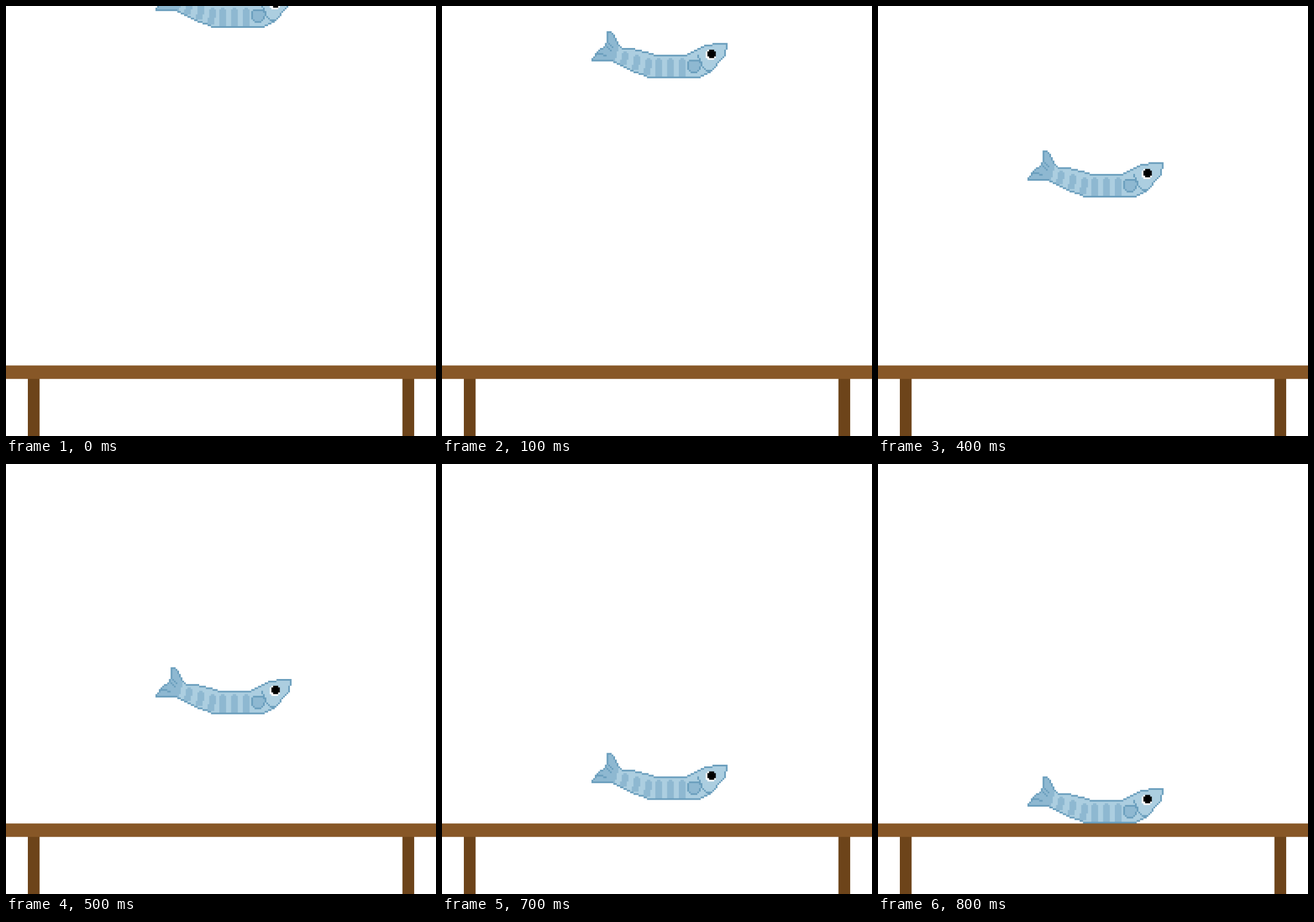
An HTML page with a canvas that plays this animation: 748x748 px, repeating every 900 ms.

```html
<!DOCTYPE html>
<html lang="en">
<head>
<meta charset="utf-8">
<title>Falling fish</title>
<style>
  html, body { margin: 0; width: 100%; height: 100%; overflow: hidden; background: #fff; }
  canvas { display: block; width: 100vw; height: 100vh; }
</style>
</head>
<body>
<canvas id="stage" width="768" height="768"></canvas>
<script>
const LINE = '#6a9ebd', BODY = '#accee0', DARK = '#8eb8d1';
const GRID = 256, CELL = 3, STEP = 100;
const FISH_X = 89, FISH_W = 81, FISH_H = 28;

// row of the fish's underside after each step
const falls = [13, 43, 73, 73, 114, 149, 182, 200, 214];

// corners in drawing order: tail, belly, snout, back
const outline = [
  [11, 0], [9, 0], [9, 5], [8, 8], [4, 11], [0, 16], [0, 17],
  [12, 17], [21, 22], [34, 27], [63, 27], [70, 24],
  [78, 15], [79, 14], [80, 7], [72, 7], [71, 8], [67, 8],
  [59, 12], [55, 14], [38, 14], [36, 13], [24, 10], [18, 10], [16, 8], [12, 1]
];
const fin = [[58, 17], [63, 17], [65, 19], [65, 20], [62, 24], [59, 24], [57, 22], [57, 18]];
const gill = [[63, 14], [63, 15], [65, 18], [65, 20], [68, 23], [70, 23]];

function painter(ctx) {
  const rect = (color, x, y, w = 1, h = 1) => {
    ctx.fillStyle = color;
    ctx.fillRect(x, y, w, h);
  };

  const line = (color, pts) => {
    for (let i = 1; i < pts.length; i++) {
      const [x0, y0] = pts[i - 1], [x1, y1] = pts[i];
      const n = Math.max(Math.abs(x1 - x0), Math.abs(y1 - y0));
      for (let k = 0; k <= n; k++) {
        rect(color, Math.round(x0 + (x1 - x0) * k / n), Math.round(y0 + (y1 - y0) * k / n));
      }
    }
  };

  const inside = (pts, x, y) => pts.reduce((odd, [ax, ay], i) => {
    const [bx, by] = pts[(i + 1) % pts.length];
    const hit = (ay > y) !== (by > y) && x < ax + (bx - ax) * (y - ay) / (by - ay);
    return hit ? !odd : odd;
  }, false);

  const shape = (pts, colorAt) => {
    for (let y = 0; y < FISH_H; y++) {
      for (let x = 0; x < FISH_W; x++) {
        if (inside(pts, x, y)) rect(colorAt(x, y), x, y);
      }
    }
    line(LINE, [...pts, pts[0]]);
  };

  // square with its corner cells cut off
  const dot = (color, x, y, size) => {
    rect(color, x + 1, y, size - 2, size);
    rect(color, x, y + 1, size, size - 2);
  };

  return { rect, line, shape, dot };
}

function makeFish() {
  const sprite = document.createElement('canvas');
  sprite.width = FISH_W;
  sprite.height = FISH_H;
  const { rect, line, shape, dot } = painter(sprite.getContext('2d'));

  shape(outline, (x, y) => x + y / 4 < 18 ? DARK : BODY);

  // stripes lean towards the tail, then stand upright along the belly
  for (let i = 0; i < 6; i++) {
    const top = Math.min(12 + 2 * i, 16), bottom = Math.min(19 + 3 * i, 26);
    const lean = i < 3 ? 1.4 : 0;
    for (let y = top; y <= bottom; y++) {
      const x = Math.round(17 + 7 * i + lean * (bottom - y) / (bottom - top));
      if (y === top) rect(DARK, x + 1, y, 2);
      else rect(DARK, x, y, 4);
    }
  }

  line(LINE, [[9, 6], [12, 9]]);
  line(LINE, [[9, 9], [11, 11]]);
  line(LINE, [[3, 13], [6, 13], [8, 14]]);
  shape(fin, () => DARK);
  line(LINE, gill);
  dot('#fff', 68, 11, 6);
  dot('#000', 69, 11, 5);
  return sprite;
}

const ctx = document.getElementById('stage').getContext('2d');
ctx.scale(CELL, CELL);
ctx.imageSmoothingEnabled = false;
const { rect } = painter(ctx);
const fish = makeFish();

function draw(time) {
  const bottom = falls[Math.floor(time / STEP) % falls.length];
  rect('#fff', 0, 0, GRID, GRID);
  for (const x of [13, 236]) rect('#6d441a', x, 222, 7, 34);
  rect('#875727', 0, 214, GRID, 8);
  ctx.drawImage(fish, FISH_X, bottom - FISH_H);
}

const begin = performance.now();
function tick() {
  draw(performance.now() - begin);
  requestAnimationFrame(tick);
}
tick();
</script>
</body>
</html>
```
